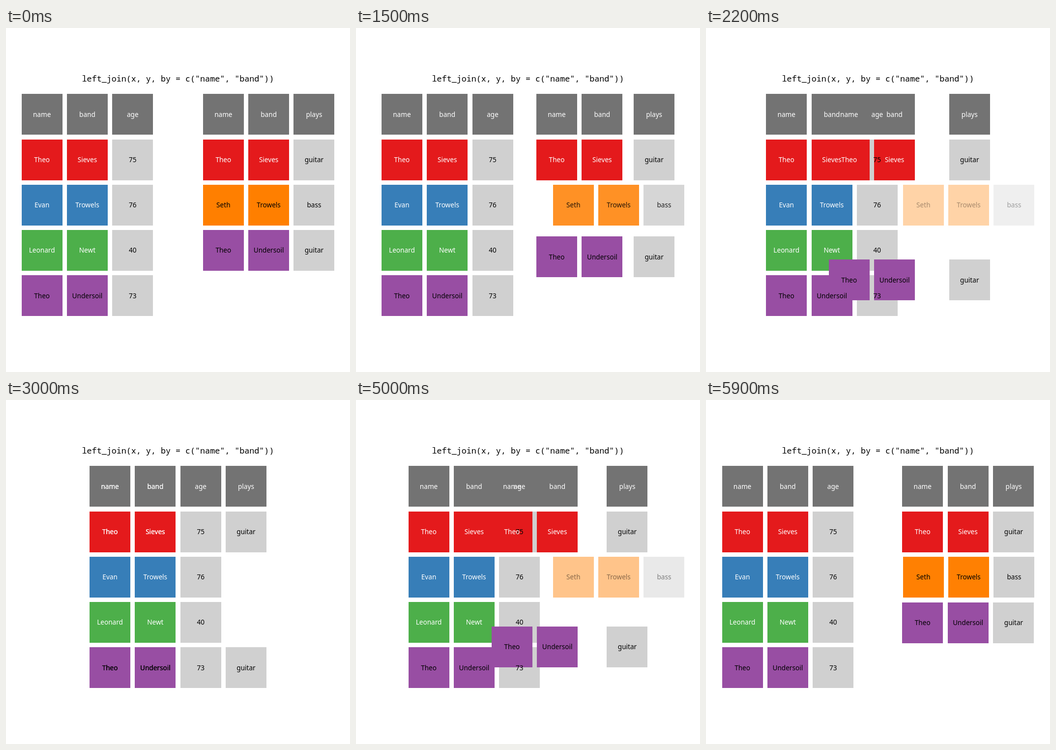
Animation, 700 px wide and 700 px high, one loop 6 s. Source, as an HTML page:

```html
<!DOCTYPE html>
<html lang="en">
<head>
<meta charset="utf-8">
<title>left_join</title>
<style>
  html, body { margin: 0; width: 100%; height: 100%; overflow: hidden; background: #fff; }
  svg { display: block; width: 100%; height: 100%; }
  text { text-anchor: middle; font: 13.6px "Noto Sans", "Open Sans", sans-serif; }
  .code { font: 16.72px "Noto Sans Mono", "DejaVu Sans Mono", monospace; white-space: pre; }
</style>
</head>
<body>
<svg viewBox="0 0 700 700">
  <g id="tiles"></g>
  <g id="labels"></g>
  <text class="code" x="350" y="109">left_join(x, y, by = c("name", "band"))</text>
</svg>
<script>
const LOOP = 6000, STEP = 100;
const SIZE = 83, X0 = 31.63, Y0 = 134.35, DX = 92.3, DY = 92.2;

// Fill and text colour of each kind of cell
const STYLES = {
  head: ['#737373', '#fff'],
  plain: ['#d0d0d0', '#000'],
  red: ['#e41a1c', '#fff'],
  blue: ['#377eb8', '#fff'],
  green: ['#4daf4a', '#fff'],
  purple: ['#984ea3', '#000'],
  orange: ['#ff7f00', '#000']
};

const LEFT = [
  ['head', 'name', 'band', 'age'],
  ['red', 'Theo', 'Sieves', '75'],
  ['blue', 'Evan', 'Trowels', '76'],
  ['green', 'Leonard', 'Newt', '40'],
  ['purple', 'Theo', 'Undersoil', '73']
];
const RIGHT = [
  ['head', 'name', 'band', 'plays'],
  ['red', 'Theo', 'Sieves', 'guitar'],
  ['orange', 'Seth', 'Trowels', 'bass'],
  ['purple', 'Theo', 'Undersoil', 'guitar']
];

function add(parentId, tag, attrs) {
  const el = document.createElementNS('http://www.w3.org/2000/svg', tag);
  set(el, attrs);
  return document.getElementById(parentId).appendChild(el);
}

function set(el, attrs) {
  for (const key in attrs) el.setAttribute(key, attrs[key]);
}

const cells = [];

function addTable(rows, firstCol, isRight) {
  rows.forEach(([kind, ...words], row) => words.forEach((word, i) => {
    const [fill, ink] = STYLES[i === 2 && kind !== 'head' ? 'plain' : kind];
    const tile = add('tiles', 'rect', { width: SIZE, height: SIZE, fill });
    const label = add('labels', 'text', { fill: ink });
    label.textContent = word;
    // Shifts are in cells; unmatched rows stay and fade
    const fades = kind === 'orange';
    const shiftX = fades ? 0 : !isRight ? 1.5 : i === 2 ? -1.5 : -2.5;
    const shiftY = isRight && kind === 'purple' ? 1 : 0;
    cells.push({ tile, label, col: firstCol + i, row, shiftX, shiftY, fades });
  }));
}

addTable(LEFT, 0, false);
addTable(RIGHT, 4, true);

const sine = u => (1 - Math.cos(Math.PI * Math.min(1, Math.max(0, u)))) / 2;

function joined(t) {
  return t < 3500 ? sine((t - 1000) / 2000) : 1 - sine((t - 4100) / 1900);
}

function draw(ms) {
  const p = joined(Math.floor((ms % LOOP) / STEP) * STEP);
  for (const c of cells) {
    const x = X0 + (c.col + c.shiftX * p) * DX;
    const y = Y0 + (c.row + c.shiftY * p) * DY;
    const opacity = c.fades ? 1 - p : 1;
    set(c.tile, { x: Math.round(x), y: Math.round(y), opacity });
    set(c.label, { x: x + SIZE / 2, y: Math.round(y + SIZE / 2) + 5, opacity });
  }
}

const start = performance.now();

function tick() {
  draw(performance.now() - start);
  requestAnimationFrame(tick);
}

tick();
</script>
</body>
</html>
```
